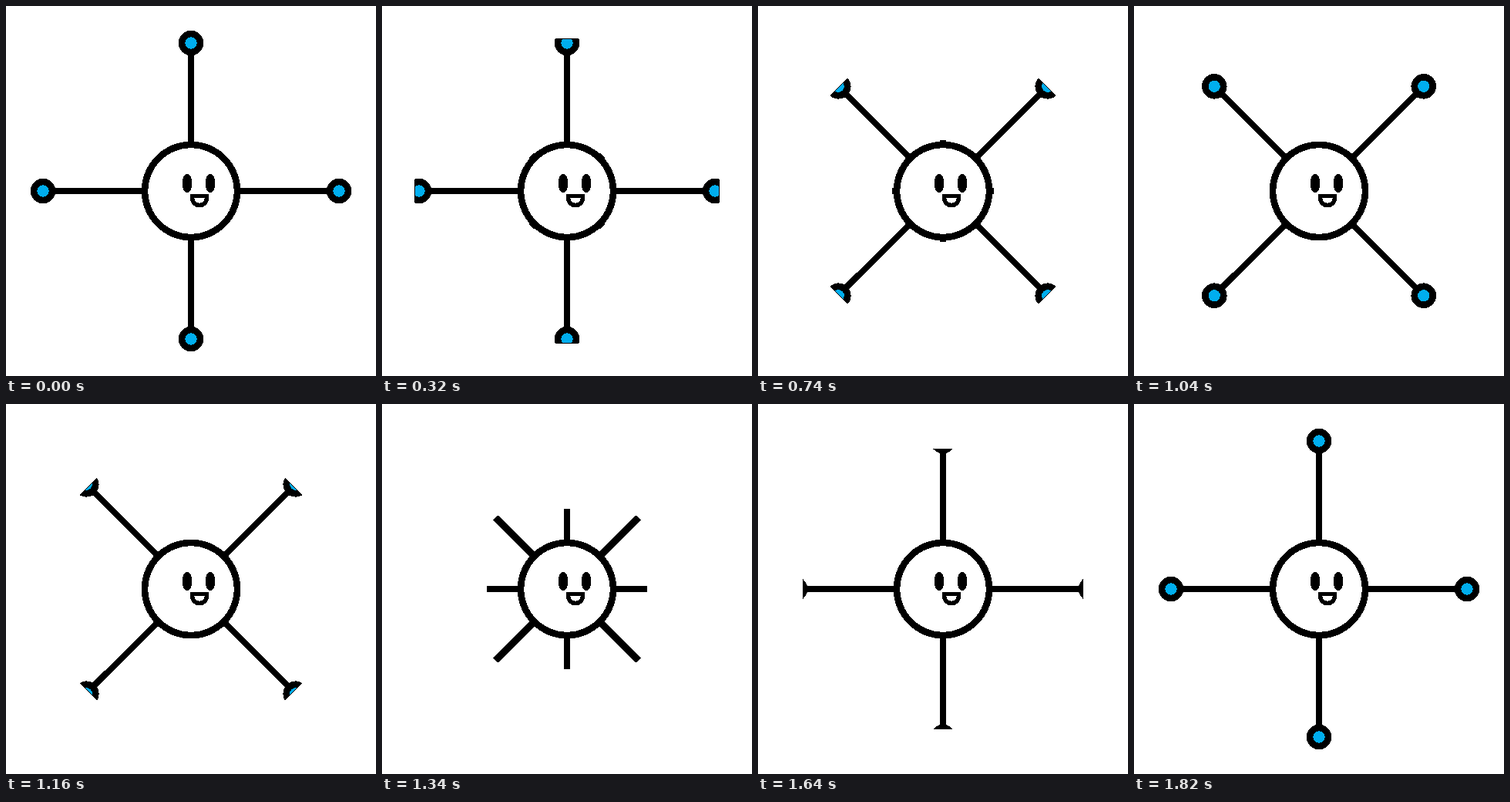
Animation of 480x480 px, one loop 1.88 s. Source, as an HTML page with a canvas:

```html
<!DOCTYPE html>
<html lang="en">
<head>
<meta charset="utf-8">
<title>Little sun</title>
<style>
  html, body { margin: 0; width: 100%; height: 100%; overflow: hidden; background: #fff; }
  canvas { display: block; }
</style>
</head>
<body>
<canvas id="stage" width="480" height="480"></canvas>
<script>
const SIZE = 480, LOOP = 1880, HOLD = 260, STEP = 60;
const REACH = 208, DOT = 192;
const BLACK = [0, 0, 0], WHITE = [255, 255, 255], BLUE = [0, 174, 239];
const ctx = document.getElementById("stage").getContext("2d", { willReadFrequently: true });

const disc = (x, y, rx, ry, color) => {
  ctx.fillStyle = `rgb(${color})`;
  ctx.beginPath();
  ctx.ellipse(x, y, rx, ry, 0, 0, 2 * Math.PI);
  ctx.fill();
};

// Arms shrink with an ease-in after `start` and grow with an ease-out up to `end`.
const shrink = (i, start, rate) => REACH - rate * Math.max(0, i - start) ** 1.49;
const grow = (i, end, rate) => REACH - rate * Math.max(0, end - i) ** 1.415;

const straightReach = i => Math.max(shrink(i, 0.5, 5.85), grow(i, 27, 5.5));
const diagonalReach = i => i < 12.5 ? grow(i, 11, 6.38) : shrink(i, 14, 7);

function arm(angle, reach) {
  if (reach <= 0) return;
  ctx.save();
  ctx.rotate(angle);
  ctx.beginPath();
  ctx.rect(0, -20, reach, 40);
  ctx.clip();
  ctx.fillStyle = "#000";
  ctx.fillRect(0, -4, DOT, 8);
  disc(DOT, 0, 16, 16, BLACK);
  disc(DOT, 0, 8, 8, BLUE);
  ctx.restore();
}

function face() {
  disc(0, 0, 64, 64, BLACK);
  disc(0, 0, 56, 56, WHITE);
  disc(-5, -10, 6, 12, BLACK);
  disc(25, -10, 6, 12, BLACK);
  ctx.lineWidth = 5;
  ctx.beginPath();
  ctx.moveTo(1.5, 6.5);
  ctx.lineTo(20.5, 6.5);
  ctx.arc(11, 9, 9.5, 0, Math.PI);
  ctx.closePath();
  ctx.stroke();
}

// Three flat colours with hard edges: partly dark pixels turn black.
function hardenEdges() {
  const image = ctx.getImageData(0, 0, SIZE, SIZE);
  const data = image.data;
  for (let p = 0; p < data.length; p += 4) {
    data.set(data[p + 2] < 215 ? BLACK : data[p] < 128 ? BLUE : WHITE, p);
  }
  ctx.putImageData(image, 0, 0);
}

function draw(i) {
  ctx.setTransform(1, 0, 0, 1, 0, 0);
  ctx.fillStyle = "#fff";
  ctx.fillRect(0, 0, SIZE, SIZE);
  ctx.translate(SIZE / 2, SIZE / 2);
  for (let k = 0; k < 8; k++) {
    arm(k * Math.PI / 4, k % 2 ? diagonalReach(i) : straightReach(i));
  }
  face();
  hardenEdges();
}

const began = performance.now();
let shown = -1;
function tick() {
  const t = (performance.now() - began) % LOOP;
  const i = t < HOLD ? 0 : 1 + Math.floor((t - HOLD) / STEP);
  if (i !== shown) draw(shown = i);
  requestAnimationFrame(tick);
}
tick();
</script>
</body>
</html>
```
